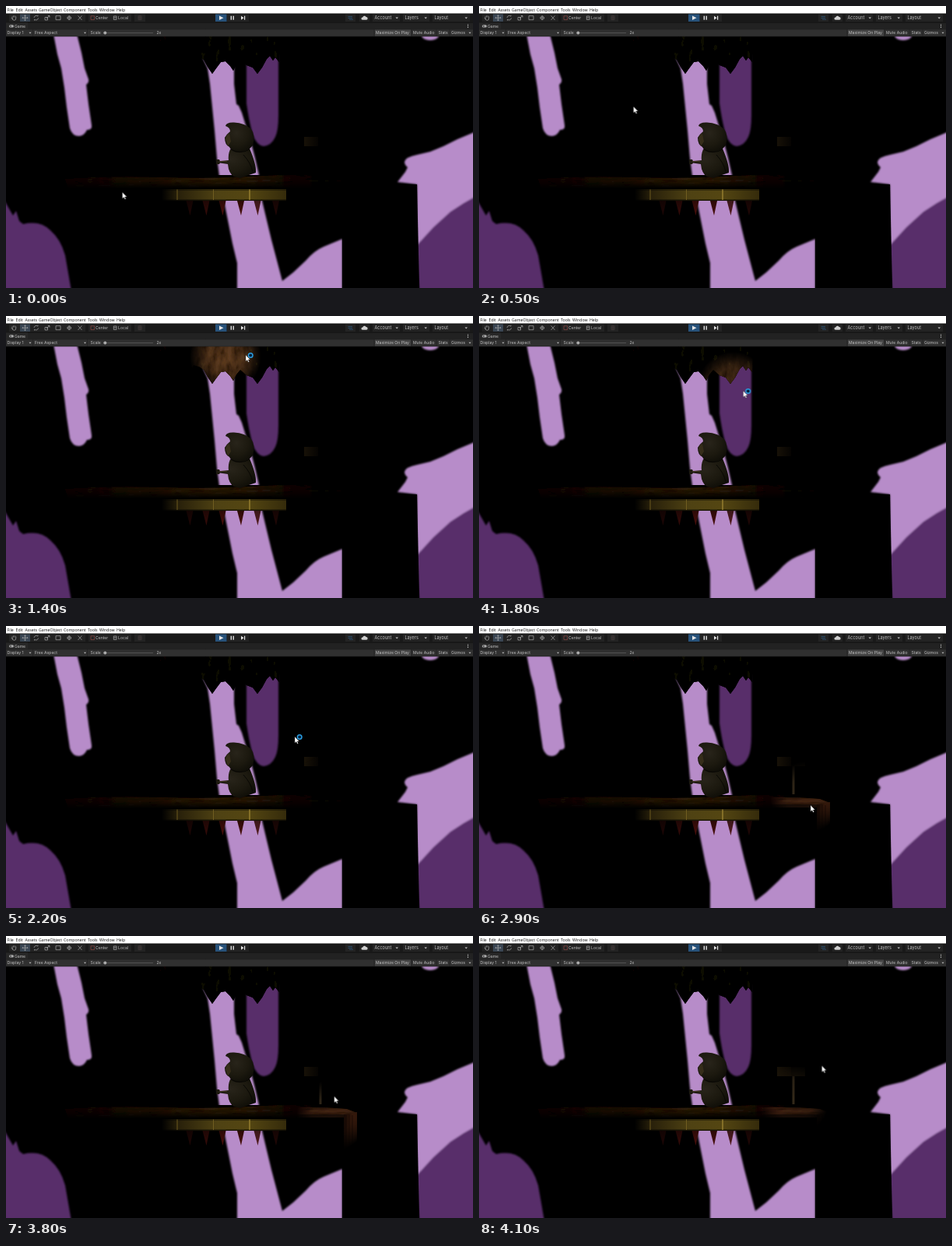
An HTML page for the animation above (4.2 s loop, 600x362 px).

```html
<!DOCTYPE html>
<html lang="en">
<head>
<meta charset="utf-8">
<title>Cave by torchlight</title>
<style>
html, body { margin: 0; width: 100%; height: 100%; overflow: hidden; background: #000; }
svg { display: block; }
text { font: 5.1px Inter, sans-serif; fill: #c0c0c0; }
.menu text { font: 5.2px "Open Sans", sans-serif; fill: #111; }
.tools text { font-size: 5.5px; }
.tools .small { font-size: 5.1px; }
.icon { fill: none; stroke: #a8a8a8; stroke-width: .7; }
.red { stroke: #8d4a44; }
.faint { stroke: #4a4040; }
.blue { stroke: #2c5a80; }
.pale { fill: #b78cc9; }
.deep { fill: #582f6b; }
#cursor { animation: cursor 4.2s infinite; }
#glow { animation: glow 4.2s infinite; }
#busy { animation: busy 4.2s step-end infinite; }
/* Every leg advances once per 100 ms. */
@keyframes cursor {
  0% { transform: translate(149.5px, 239px); animation-timing-function: steps(5); }
  11.905% { transform: translate(198.5px, 129px); animation-timing-function: steps(9); }
  33.333% { transform: translate(308px, 50px); animation-timing-function: steps(8); }
  52.381% { transform: translate(371px, 142px); animation-timing-function: steps(7); }
  69.048% { transform: translate(426px, 230px); animation-timing-function: steps(5); }
  80.952% { transform: translate(396.5px, 258px); animation-timing-function: steps(7); }
  97.619%, 100% { transform: translate(440.5px, 166.5px); }
}
@keyframes glow {
  0% { transform: translate(150px, 240px); opacity: 0; animation-timing-function: steps(5); }
  11.905% { transform: translate(199px, 130px); opacity: .5; animation-timing-function: steps(9); }
  33.333% { transform: translate(282px, 52px); opacity: 1; animation-timing-function: steps(8); }
  52.381% { transform: translate(371px, 132px); opacity: .6; animation-timing-function: steps(7); }
  69.048% { transform: translate(420px, 220px); opacity: .8; animation-timing-function: steps(5); }
  80.952% { transform: translate(439px, 258px); opacity: .85; animation-timing-function: steps(7); }
  97.619%, 100% { transform: translate(404px, 210px); opacity: .75; }
}
@keyframes busy {
  0% { opacity: 0; }
  23.8% { opacity: 1; }
  59.5%, 100% { opacity: 0; }
}
</style>
</head>
<body>
<svg width="600" height="362" viewBox="0 0 600 362">
  <defs>
    <filter id="soft"><feGaussianBlur stdDeviation=".9"/></filter>
    <filter id="blur"><feGaussianBlur stdDeviation="1.1"/></filter>
    <filter id="bark" x="0" y="0" width="1" height="1">
      <feTurbulence type="fractalNoise" baseFrequency=".04 .3" numOctaves="2" seed="4"/>
      <feColorMatrix values="0 0 0 0 0  0 0 0 0 0  0 0 0 0 0  1.2 0 0 0 -.35"/>
      <feComposite in2="SourceAlpha" operator="in" result="grain"/>
      <feMerge><feMergeNode in="SourceGraphic"/><feMergeNode in="grain"/></feMerge>
    </filter>
    <filter id="stone" x="0" y="0" width="1" height="1">
      <feTurbulence type="fractalNoise" baseFrequency=".12 .06" numOctaves="3" seed="9"/>
      <feColorMatrix values="0 0 0 0 0  0 0 0 0 0  0 0 0 0 0  1.4 0 0 0 -.4"/>
      <feComposite in2="SourceAlpha" operator="in" result="grain"/>
      <feMerge><feMergeNode in="SourceGraphic"/><feMergeNode in="grain"/></feMerge>
    </filter>
    <radialGradient id="spot">
      <stop stop-color="#fff"/><stop offset=".55" stop-color="#ccc"/><stop offset="1" stop-color="#000"/>
    </radialGradient>
    <linearGradient id="wood" x1="75" x2="435" gradientUnits="userSpaceOnUse">
      <stop stop-color="#120c05"/><stop offset=".25" stop-color="#211408"/>
      <stop offset=".58" stop-color="#35220f"/><stop offset=".8" stop-color="#1a1006"/>
      <stop offset="1" stop-color="#050301"/>
    </linearGradient>
    <linearGradient id="shade" x2="0" y2="1">
      <stop stop-color="#000" stop-opacity="0"/><stop offset=".5" stop-color="#000" stop-opacity=".2"/>
      <stop offset="1" stop-color="#000"/>
    </linearGradient>
    <linearGradient id="brick" x1="200" x2="360" gradientUnits="userSpaceOnUse">
      <stop stop-color="#000"/><stop offset=".13" stop-color="#28200a"/>
      <stop offset=".45" stop-color="#4f4213"/><stop offset=".7" stop-color="#544612"/>
      <stop offset="1" stop-color="#352b0b"/>
    </linearGradient>
    <linearGradient id="blood" x2="0" y2="1">
      <stop stop-color="#2c0a07"/><stop offset="1" stop-color="#4b0f0c"/>
    </linearGradient>
    <linearGradient id="board">
      <stop stop-color="#171107"/><stop offset="1" stop-color="#060402"/>
    </linearGradient>
    <linearGradient id="stump">
      <stop stop-color="#1c0c06"/><stop offset=".5" stop-color="#45210f"/><stop offset="1" stop-color="#703418"/>
    </linearGradient>
    <radialGradient id="cloak" cx=".4" cy=".35" r=".75">
      <stop stop-color="#28241a"/><stop offset=".55" stop-color="#1c190f"/><stop offset="1" stop-color="#0c0b06"/>
    </radialGradient>
    <linearGradient id="dim" x1="185" x2="350" gradientUnits="userSpaceOnUse">
      <stop stop-color="#050301"/><stop offset=".45" stop-color="#110b04"/><stop offset="1" stop-color="#0c0804"/>
    </linearGradient>
    <mask id="torch" maskUnits="userSpaceOnUse" x="0" y="39" width="600" height="323">
      <circle id="glow" r="46" fill="url(#spot)"/>
    </mask>
    <path id="roof" d="M183 39L189 72 193 75 197 68 200 79 204 70 214 62 220 76 226 63 236 73 241 63 248 65 254 69 259 78 265 87 270 80 276 72 282 71 288 77 292 83 296 75 301 69 309 76 317 79 323 87 329 79 335 68 339 64 343 70 346 66 351 72 352 39Z"/>
    <path id="log" d="M75 222Q130 218 200 220T330 218 435 222L438 229 430 234 80 234Z"/>
  </defs>

  <rect width="600" height="362"/>

  <g filter="url(#soft)">
    <path class="pale" d="M61 36H91L97 60 101 80 106 94Q107 98 103 101L106 126 110 153Q111 159 104 159 101 166 94 167 85 167 82 157L78 130 75 105 71 80 66 62Z"/>
    <path class="pale" d="M250 60H293V100L296 126 299 128 303 137 307 150 314 172 320 195 325 217 329 250 341 300 355 353 369 342 385 327Q396 314 408 309L432 299V364H297V330L291 305 286 280 280 250 274 218 271 195 268 160 265 130 262 100 259 80Z"/>
    <path class="deep" d="M309 62H350V140Q350 160 346 168 341 179 331 180 322 179 317 165 312 147 309 125Z"/>
    <ellipse class="pale" cx="545" cy="38" rx="11" ry="6"/>
  </g>
  <g filter="url(#blur)">
    <path class="pale" d="M604 161L580 171 562 180 545 187 528 191Q513 194 512 200 512 204 516 207L513 213 503 226 528 229V310H604Z"/>
    <path class="deep" d="M604 244L588 253 571 264 549 284 527 308 531 366H604Z"/>
    <path class="deep" d="M-3 248L9 269 13 263 17 276 22 280Q44 275 57 288 70 299 76 320L84 366H-3Z"/>
  </g>
  <path d="M432 226L528 229 531 362H432Z"/>

  <use href="#roof"/>
  <use href="#roof" fill="url(#dim)" filter="url(#stone)"/>

  <path d="M75 217H440V250H75Z"/>
  <use href="#log" fill="url(#wood)" filter="url(#bark)"/>
  <use href="#log" fill="url(#shade)"/>
  <path d="M200 235H360V249.5H200Z" fill="url(#brick)"/>
  <path d="M200 235H360V237H200ZM200 248H360V250H200Z" opacity=".35"/>
  <path d="M220 235.5V249M266.5 235.5V249" stroke="#756123" stroke-width=".9"/>
  <path d="M313 235.5V249" stroke="#a58b36" stroke-width="1.2"/>
  <g id="spikes" fill="url(#blood)"></g>

  <path d="M383 168H401V180H383Z" fill="url(#board)"/>

  <g fill="url(#cloak)">
    <path d="M288 184Q285 191 286 198L275 199 274 197H270V203H274L275 201.5 285 203Q286 215 293 219L301 221 309 218 321 214Q322 204 313 183Z"/>
    <path d="M282 154Q283 149 293 149.5 307 150 315 158 321 166 317 179 311 187 298 188 290 188 287 181 281 178 281 169 284 164 288 161 288 156 282 154Z"/>
    <path d="M282 171Q283 165 287 164L289 174 285 180Z" fill="#352d1a"/>
    <path d="M274 199.5H284" stroke="#3c321d"/>
    <path d="M289 184Q301 191 313 184M305 191Q315 202 317 213" fill="none" stroke="#080704"/>
  </g>

  <g mask="url(#torch)">
    <use href="#roof" fill="#603e22" filter="url(#stone)"/>
    <path d="M355 220Q400 219 438 222L451 227 447 233 355 233Z" fill="#5a331e" filter="url(#bark)"/>
    <path d="M355 229H436V234H355Z" opacity=".55"/>
    <path d="M434 229L451 226 451 285 447 292H434Z" fill="url(#stump)"/>
    <path d="M437 230V290M441 229V290M445 230V290" stroke="#1e0b05" opacity=".7"/>
    <path d="M383 168H419V180H383Z" fill="#241b0d"/>
    <path d="M402.5 180H405.5V216H402.5Z" fill="#453722"/>
  </g>

  <rect y="9" width="600" height="12.5" fill="#191919"/>
  <g class="menu">
    <rect width="600" height="9.5" fill="#fff"/>
    <text x="1.5" y="6.6">File</text><text x="12.5" y="6.6">Edit</text>
    <text x="24.5" y="6.6">Assets</text><text x="42" y="6.6">GameObject</text>
    <text x="74" y="6.6">Component</text><text x="105" y="6.6">Tools</text>
    <text x="120" y="6.6">Window</text><text x="142" y="6.6">Help</text>
  </g>

  <g class="tools">
    <path d="M4 10.5H102V20H4ZM106 10.5H161V20H106ZM165 10.5H179V20H165ZM284 10.5H312V20H284ZM436 10.5H449V20H436ZM454 10.5H467V20H454ZM471 10.5H506V20H471ZM510 10.5H544V20H510ZM548 10.5H596V20H548Z" fill="#232323"/>
    <path d="M18 10.5H31V20H18Z" fill="#3a4653"/>
    <path d="M269 10.5H283.5V20H269Z" fill="#27527a"/>
    <path d="M274 12.5L279.5 15.2 274 18ZM288.6 12.8H290V17.8H288.6ZM291.5 12.8H292.9V17.8H291.5ZM302 12.8L305.5 15.3 302 17.8ZM306 12.8H307.2V17.8H306Z" fill="#e2e2e2"/>
    <path class="icon" d="M8 15V13.4M9.6 14.5V12.4M11.2 14.5V12.4M12.8 15V13.4M8 15Q8 18.4 10.5 18.4T12.8 15M7 15.2L8.5 17M24.5 11.7V18.8M21 15.2H28M23.4 12.8L24.5 11.7 25.6 12.8M23.4 17.7L24.5 18.8 25.6 17.7M22 14.1L21 15.2 22 16.3M27 14.1L28 15.2 27 16.3M36 15A3 3 0 0 1 41 13.2V11.8M41.5 15.5A3 3 0 0 1 36.5 17.2V18.6M50 18V14.5H53.5V18ZM52 16L56 12.5M53.8 12.5H56V14.7M64 12.7H70V17.7H64ZM78.5 15.2H84M81.2 12.4V18M81.2 13A2.3 2.3 0 1 0 81.3 13M92.5 12.5L97.5 18M97.5 12.5L92.5 18"/>
    <path class="icon red" d="M109 12.8H113.5V17.6H109Z"/>
    <path class="icon" d="M138.3 13H142V17.5H138.3ZM138.3 15H142"/>
    <path class="icon faint" d="M170 12.8H174V17.6H170ZM170 15.2H174M172 12.8V17.6"/>
    <text class="small" x="115" y="17">Center</text><text class="small" x="144" y="17">Local</text>
    <path class="icon blue" d="M439.5 13.5H445M439.5 15.5H445M441 17.3H446"/>
    <path d="M458 17.8A1.7 1.7 0 0 1 458.3 14.4 2.3 2.3 0 0 1 462.5 14 1.9 1.9 0 0 1 463 17.8Z" fill="#d0d0d0"/>
    <text x="473.5" y="17.2">Account</text><text x="512.5" y="17.2">Layers</text><text x="550.5" y="17.2">Layout</text>
    <path d="M500.5 14.5H504L502.2 16.5ZM537.5 14.5H541L539.2 16.5ZM589.5 14.5H593L591.2 16.5Z" fill="#c0c0c0"/>
  </g>

  <rect y="21.5" width="600" height="9" fill="#222"/>
  <rect y="21.5" width="28" height="9" fill="#282828"/>
  <rect y="30" width="600" height="9" fill="#303030"/>
  <path d="M0 30H600M0 39H600M34.5 30V39M104.5 30V39M473 30V39M521 30V39M553 30V39M570 30V39" stroke="#1f1f1f" stroke-width=".6"/>
  <rect x="474" y="30.5" width="46" height="8" fill="#444"/>
  <rect x="4" y="24.2" width="6" height="3.4" rx="1.7" fill="#aaa"/>
  <path d="M5 25.9H7M6 24.9V26.9" stroke="#222" stroke-width=".6"/>
  <text x="11" y="27.8">Game</text>
  <path d="M593.5 23.5V28" stroke="#c0c0c0" stroke-width="1.1" stroke-dasharray="1 .8"/>
  <text x="1.5" y="36.3">Display 1</text><text x="37" y="36.3">Free Aspect</text>
  <text x="108.5" y="36.3">Scale</text><text x="193.5" y="36.3">2x</text>
  <path d="M29.5 33.8H32.5L31 35.6ZM100 33.8H103L101.5 35.6ZM594.5 33.8H597.5L596 35.6Z" fill="#c0c0c0"/>
  <path d="M126 34.6H189" stroke="#5c5c5c" stroke-width=".8"/>
  <circle cx="127.3" cy="34.6" r="2" fill="#aaa"/>
  <text x="475" y="36.3">Maximize On Play</text><text x="523" y="36.3">Mute Audio</text>
  <text x="555.5" y="36.3">Stats</text><text x="572" y="36.3">Gizmos</text>

  <g id="cursor">
    <path d="M0 0V8.2L1.9 6.5 3.2 9.3 4.5 8.7 3.2 6H5.7Z" fill="#fff" stroke="#222" stroke-width=".35"/>
    <g id="busy">
      <circle cx="6.2" cy=".5" r="2.8" fill="#06203a" stroke="#2b9de0" stroke-width="1.5"/>
    </g>
  </g>
</svg>
<script>
const spikes = document.getElementById('spikes');
[236, 257, 278, 301.5, 323, 346.5].forEach((x, i) => {
  const spike = document.createElementNS('http://www.w3.org/2000/svg', 'path');
  spike.setAttribute('d', `M${x - 4.5} 250h9l-4 19z`);
  spike.setAttribute('opacity', [.4, .7, 1, 1, .9, .45][i]);
  spikes.append(spike);
});
</script>
</body>
</html>
```
